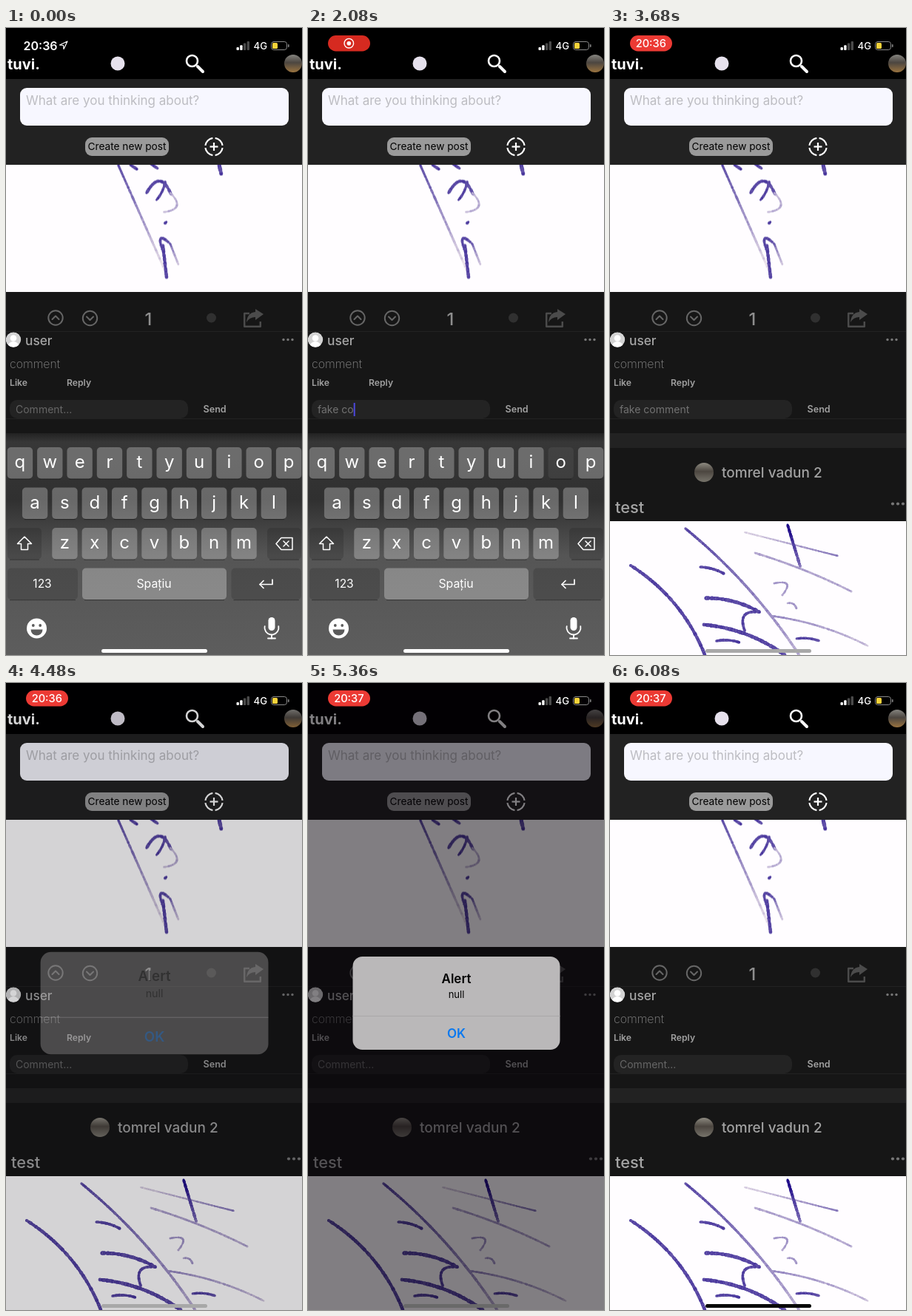
Write an HTML page with a canvas that moves like this. It is 400 by 848 pixels and loops after 6120 ms.

```html
<!DOCTYPE html>
<html lang="en">
<head>
<meta charset="utf-8">
<title>Comment demo</title>
<style>
html, body { margin: 0; width: 100%; height: 100%; overflow: hidden; background: #000; }
canvas { display: block; width: 100vw; height: 100vh; }
</style>
</head>
<body>
<canvas id="stage"></canvas>
<script>
const W = 400, H = 848, LOOP = 6120;
const canvas = document.getElementById('stage');
const dpr = window.devicePixelRatio || 1;
canvas.width = W * dpr;
canvas.height = H * dpr;
let ctx = canvas.getContext('2d');

const PHRASE = 'fake comment';
const FIRST_KEY = 944, KEY_STEP = 176, PRESS = 110;

const clamp = v => Math.max(0, Math.min(1, v));
const span = (t, a, b) => clamp((t - a) / (b - a));
const ease = p => p * p * (3 - 2 * p);
const lerp = (a, b, p) => a + (b - a) * p;

let seed = 7;
function random() {
  seed = (seed * 16807) % 2147483647;
  return seed / 2147483647;
}

function box(x, y, w, h, r, fill) {
  ctx.beginPath();
  ctx.roundRect(x, y, w, h, r);
  ctx.fillStyle = fill;
  ctx.fill();
}

function disc(x, y, r, fill) {
  ctx.beginPath();
  ctx.arc(x, y, r, 0, 7);
  ctx.fillStyle = fill;
  ctx.fill();
}

function arc(x, y, r, color, width, from = 0, to = 2 * Math.PI) {
  ctx.beginPath();
  ctx.arc(x, y, r, from, to);
  ctx.strokeStyle = color;
  ctx.lineWidth = width;
  ctx.stroke();
}

function line(color, width, ...p) {
  ctx.beginPath();
  for (let i = 0; i < p.length; i += 2) ctx.lineTo(p[i], p[i + 1]);
  ctx.strokeStyle = color;
  ctx.lineWidth = width;
  ctx.stroke();
}

function text(str, x, y, size, color, weight = 400, align = 'left') {
  ctx.font = `${weight} ${size}px Inter, Roboto, sans-serif`;
  ctx.textAlign = align;
  ctx.fillStyle = color;
  ctx.fillText(str, x, y);
}

function dots(x, y, gap, r) {
  for (let i = 0; i < 3; i++) disc(x + i * gap, y, r, '#777');
}

// Ragged pen stroke: bowed by bend, tone runs from ink (0) to nearly paper (1)
function pen(x0, y0, x1, y1, bend = 0, width = 4, tone = .08, endTone = tone) {
  const dx = x1 - x0, dy = y1 - y0, len = Math.hypot(dx, dy) || 1;
  for (let d = 0; d <= len; d += .8) {
    const s = d / len, bow = 4 * s * (1 - s) * bend / len;
    const p = lerp(tone, endTone, s) + (random() - .5) * .25;
    const color = `rgb(${lerp(75, 230, p)},${lerp(57, 221, p)},${lerp(158, 232, p)})`;
    disc(x0 + dx * s + dy * bow, y0 + dy * s - dx * bow, width * lerp(.36, .54, random()), color);
  }
}

function upperInk() {
  pen(152, 186, 214, 326, 0, 3.2, .1, 1);
  pen(168, 185, 177, 191);
  pen(196, 184, 205, 190);
  pen(288, 185, 291, 198, 0, 5);
  pen(190, 223, 223, 225, 17, 4.5);
  pen(215, 208, 203, 233, 2, 3.5);
  pen(222, 223, 213, 249, 14, 3, .7);
  pen(215, 264, 217, 262);
  pen(211, 299, 222, 292, 13);
  pen(212, 294, 217, 337, 0, 4.5);
  pen(222, 292, 233, 320, 0, 3, .3, .9);
}

function lowerInk() {
  pen(28, 727, 129, 850, 13, 4.5);
  pen(102, 677, 257, 850, 9, 3.6, .1, .7);
  pen(182, 682, 308, 714, 0, 2.5, .95, .4);
  pen(240, 672, 257, 728, 0, 4, -.3, .3);
  pen(196, 710, 326, 762, 3, 3, .65);
  pen(122, 729, 154, 738, 2);
  pen(222, 751, 232, 768, 14, 3, .6);
  pen(240, 778, 252, 785, 3, 3, .6);
  pen(130, 771, 202, 790, 5, 5);
  pen(202, 790, 182, 815, -13);
  pen(127, 807, 236, 848, 8, 5);
  pen(217, 795, 349, 836, 6, 2.8, .5, .8);
  pen(144, 829, 175, 831, 2);
  pen(252, 826, 283, 829, 2, 3.5);
}

function makePaper(y, h, ink) {
  const sheet = document.createElement('canvas');
  sheet.width = canvas.width;
  sheet.height = Math.round(h * dpr);
  const main = ctx;
  ctx = sheet.getContext('2d');
  ctx.scale(dpr, dpr);
  ctx.fillStyle = '#fffdff';
  ctx.fillRect(0, 0, W, h);
  ctx.translate(0, -y);
  ink();
  ctx = main;
  return () => ctx.drawImage(sheet, 0, y, W, h);
}

const drawUpper = makePaper(184.5, 172, upperInk);
const drawLower = makePaper(667, 181, lowerInk);

function photo(x, y, r, top, bottom) {
  const g = ctx.createLinearGradient(x, y - r, x, y + r);
  g.addColorStop(0, top);
  g.addColorStop(.45, '#4c4640');
  g.addColorStop(1, bottom);
  disc(x, y, r, g);
}

function silhouette(x, y, r) {
  ctx.save();
  ctx.beginPath();
  ctx.arc(x, y, r, 0, 7);
  ctx.clip();
  disc(x, y, r, '#d3d3d3');
  disc(x, y - 2, r * .42, '#fff');
  disc(x, y + r, r * .75, '#fff');
  ctx.restore();
}

function drawHeader() {
  ctx.fillStyle = '#222';
  ctx.fillRect(0, 69, W, 116);
  text('tuvi.', 2, 56, 20, '#fff', 700);
  disc(151, 48, 9.5, '#e6e1ec');
  arc(251.5, 44.5, 7.5, '#fff', 2.6);
  line('#fff', 4, 259, 52, 266, 59);
  photo(388, 48, 12, '#85847f', '#9a7440');
  box(19, 81, 363, 51, 9, '#f7f7ff');
  text('What are you thinking about?', 27, 104, 17, '#bdbdc2');
  box(107, 148, 113, 25, 9, '#9a9a9a');
  text('Create new post', 163.5, 165, 13.7, '#000', 400, 'center');
  ctx.lineCap = 'butt';
  for (let i = 0; i < 4; i++) {
    const a = i * Math.PI / 2;
    arc(281, 160.5, 11.7, '#fff', 2.2, a + .14, a + Math.PI / 2 - .14);
  }
  line('#fff', 2.2, 275.5, 160.5, 286.5, 160.5);
  line('#fff', 2.2, 281, 155, 281, 166);
  ctx.lineCap = 'round';
}

function vote(x, y, dir) {
  arc(x, y, 9.7, '#666', 2);
  line('#666', 2, x - 4.5, y + 2 * dir, x, y - 2.5 * dir, x + 4.5, y + 2 * dir);
}

function drawActions() {
  vote(67, 392, 1);
  vote(113.5, 392.5, -1);
  text('1', 192.5, 402, 23.5, '#8e8e8e', 500, 'center');
  disc(277.5, 392, 6.5, '#303030');
  ctx.lineCap = 'butt';
  line('#4b4b4b', 2.5, 329, 386, 322.2, 386, 322.2, 403.8, 343.8, 403.8, 343.8, 397);
  ctx.lineCap = 'round';
  ctx.beginPath();
  ctx.moveTo(348, 387);
  ctx.lineTo(337, 380);
  ctx.lineTo(337, 384);
  ctx.quadraticCurveTo(326, 385, 325, 398);
  ctx.quadraticCurveTo(329, 391, 337, 391);
  ctx.lineTo(337, 395);
  ctx.fillStyle = '#4b4b4b';
  ctx.fill();
}

const typedCount = t => Math.max(0, Math.min(PHRASE.length, Math.floor((t - FIRST_KEY) / KEY_STEP) + 1));

function pressedKey(t) {
  const since = t - FIRST_KEY;
  return since >= 0 && since % KEY_STEP < PRESS ? PHRASE[Math.floor(since / KEY_STEP)] : undefined;
}

function drawComment(t) {
  silhouette(10, 421.5, 10.3);
  text('user', 26, 429, 17.3, '#a5a5a5', 500);
  dots(375, 421.5, 6, 1.7);
  text('comment', 5, 460, 15.8, '#8c8c8c', 200);
  text('Like', 5, 484, 12.2, '#a0a0a0', 600);
  text('Reply', 82, 484, 12.2, '#a0a0a0', 600);
  text('Send', 266.5, 519.5, 12.6, '#a0a0a0', 600);
  box(5, 503, 241, 25, 10, '#232323');

  const typed = t < 4280 ? PHRASE.slice(0, typedCount(t)) : '';
  text(typed || 'Comment...', 13, 521, 14, typed ? '#727272' : '#666');
  if (t > 160 && t < 3280) {
    const x = typed ? 13 + ctx.measureText(typed).width : 12;
    ctx.fillStyle = '#4c48df';
    ctx.fillRect(x, 507, 2, 18);
  }
}

function drawPage(t) {
  ctx.fillStyle = '#000';
  ctx.fillRect(0, 0, W, H);
  drawHeader();
  ctx.fillStyle = '#161616';
  ctx.fillRect(0, 356, W, H - 356);
  drawUpper();
  drawActions();
  ctx.fillStyle = '#222';
  ctx.fillRect(0, 410, W, 1);
  ctx.fillRect(0, 528, W, 1);
  ctx.fillRect(0, 548, W, 20);
  drawComment(t);
  photo(127, 601, 13, '#8d8a80', '#77746b');
  text('tomrel vadun 2', 151, 608, 19, '#a2a2a2', 500);
  text('test', 7, 656, 21.8, '#a5a5a5', 500);
  dots(382, 643.5, 7, 2.1);
  drawLower();
}

function key(x, y, w, fill) {
  ctx.fillStyle = 'rgba(0,0,0,.35)';
  ctx.fillRect(x + 3, y + 42.5, w - 6, 1.2);
  box(x, y, w, 42.5, 5, fill);
}

function drawKeys(t) {
  const down = pressedKey(t);
  const shade = (c, normal) => c === down ? 'rgba(255,255,255,.06)' : normal;
  const dim = 'rgba(0,0,0,.14)', pitch = 40.35;
  ['qwertyuiop', 'asdfghjkl', 'zxcvbnm'].forEach((row, r) => {
    const y = 567 + r * 54.5;
    [...row].forEach((c, i) => {
      const x = 200.5 + (i - (row.length - 1) / 2) * pitch;
      key(x - 17.2, y, 34.4, shade(c, 'rgba(255,255,255,.27)'));
      text(c, x, y + 28, 24, '#fff', 400, 'center');
    });
  });
  key(2, 676, 46, dim);
  key(353, 676, 46, dim);
  key(2, 730.5, 95, dim);
  key(103, 730.5, 195, shade(' ', 'rgba(255,255,255,.29)'));
  key(304.5, 730.5, 94.5, dim);
  text('123', 49, 757, 15.5, '#fff', 400, 'center');
  text('Spațiu', 200, 756.5, 15.8, '#fff', 400, 'center');
  line('#fff', 1.5, 25, 688, 15.5, 697.5, 20.5, 697.5, 20.5, 705.5, 29.5, 705.5, 29.5, 697.5, 34.5, 697.5, 25, 688);
  line('#fff', 1.5, 365, 697.5, 372, 689.5, 387, 689.5, 387, 705.5, 372, 705.5, 365, 697.5);
  line('#fff', 1.5, 375, 694, 382, 701);
  line('#fff', 1.5, 382, 694, 375, 701);
  line('#fff', 1.7, 360, 746, 360, 752.5, 343, 752.5);
  line('#fff', 1.7, 348, 747.5, 343, 752.5, 348, 757.5);
}

function drawSmiley(x, y) {
  const gap = '#5b5b5b';
  disc(x, y, 13.5, '#fff');
  disc(x - 4.7, y - 4, 1.9, gap);
  disc(x + 4.7, y - 4, 1.9, gap);
  ctx.beginPath();
  ctx.arc(x, y + 1.5, 8, 0, Math.PI);
  ctx.fillStyle = gap;
  ctx.fill();
}

function drawMic(x, y) {
  box(x - 4.5, y - 15, 9, 18, 4.5, '#fff');
  arc(x, y - 1, 9.5, '#fff', 1.8, -.2, Math.PI + .2);
  line('#fff', 1.8, x, y + 9, x, y + 13.5);
  line('#fff', 1.8, x - 5, y + 13.5, x + 5, y + 13.5);
}

function drawKeyboard(t) {
  const p = span(t, 3300, 3640);
  if (p >= 1) return;
  ctx.save();
  ctx.translate(0, 300 * ease(p));
  const g = ctx.createLinearGradient(0, 548, 0, 848);
  g.addColorStop(0, '#222');
  g.addColorStop(.04, '#373737');
  g.addColorStop(.3, '#303030');
  g.addColorStop(.55, '#555');
  g.addColorStop(1, '#5d5d5d');
  ctx.fillStyle = g;
  ctx.fillRect(0, 548, W, 300);
  drawKeys(t);
  drawSmiley(41.5, 812);
  drawMic(359, 812);
  ctx.restore();
}

function drawAlert(t) {
  const enter = ease(span(t, 4380, 4640));
  const leave = span(t, 5400, 5760);
  const shade = enter * (1 - leave);
  if (shade <= 0) return;
  ctx.fillStyle = `rgba(4,0,6,${.5 * shade})`;
  ctx.fillRect(0, 0, W, H);
  ctx.save();
  ctx.globalAlpha = shade;
  const k = lerp(1.15, 1, enter);
  ctx.translate(200, 433);
  ctx.scale(k, k);
  ctx.translate(-200, -433);
  box(60.5, 370, 280, 126, 13, '#bab8b9');
  ctx.fillStyle = '#a9a7a8';
  ctx.fillRect(60.5, 450, 280, 1);
  text('Alert', 200.5, 406, 17, '#000', 600, 'center');
  text('null', 200.5, 426, 13, '#000', 400, 'center');
  text('OK', 200.5, 480, 17, '#0878f0', 600, 'center');
  ctx.restore();
}

function drawStatus(t) {
  const clock = t < 5120 ? '20:36' : '20:37';
  const pill = span(t, 240, 440);
  const recording = t >= 520 && t < 3400;
  ctx.globalAlpha = 1 - pill;
  text(clock, 23.5, 29.5, 16, '#fff', 600);
  line('#fff', 1.2, 83, 18, 72.5, 23, 77.5, 23.5, 78, 28.5, 83, 18);
  ctx.globalAlpha = pill;
  box(27, 10, 57, 21.5, 10.7, recording ? '#d62a20' : '#ec3a34');
  if (recording) {
    arc(55.3, 20.7, 6.3, '#fff', 1.4);
    disc(55.3, 20.7, 2.8, '#fff');
  } else {
    text(clock, 55.3, 26, 14.6, '#fff', 500, 'center');
  }
  ctx.globalAlpha = 1;
  for (let i = 0; i < 4; i++) {
    const h = 4 + 2.7 * i;
    box(311.5 + i * 4.7, 30 - h, 3.4, h, 1, i < 2 ? '#fff' : '#4a4a4a');
  }
  text('4G', 334.5, 29, 13.2, '#fff', 500);
  ctx.beginPath();
  ctx.roundRect(358.5, 18.5, 21, 11, 3.3);
  ctx.strokeStyle = '#8a8a8a';
  ctx.lineWidth = 1;
  ctx.stroke();
  box(360, 20, 7, 8, 1.5, '#f8d33a');
  box(381, 22, 1.6, 4, 1, '#8a8a8a');
}

function drawHomeBar(t) {
  const tone = 255 - 87 * span(t, 3440, 3640) - 160 * span(t, 5100, 5760);
  box(129, 840, 143, 5, 2.5, `rgb(${tone},${tone},${tone})`);
}

function draw(t) {
  ctx.setTransform(canvas.width / W, 0, 0, canvas.height / H, 0, 0);
  ctx.globalAlpha = 1;
  ctx.lineCap = ctx.lineJoin = 'round';
  drawPage(t);
  drawKeyboard(t);
  drawAlert(t);
  drawStatus(t);
  drawHomeBar(t);
}

const start = performance.now();
function tick() {
  draw((performance.now() - start) % LOOP);
  requestAnimationFrame(tick);
}
tick();
</script>
</body>
</html>
```
